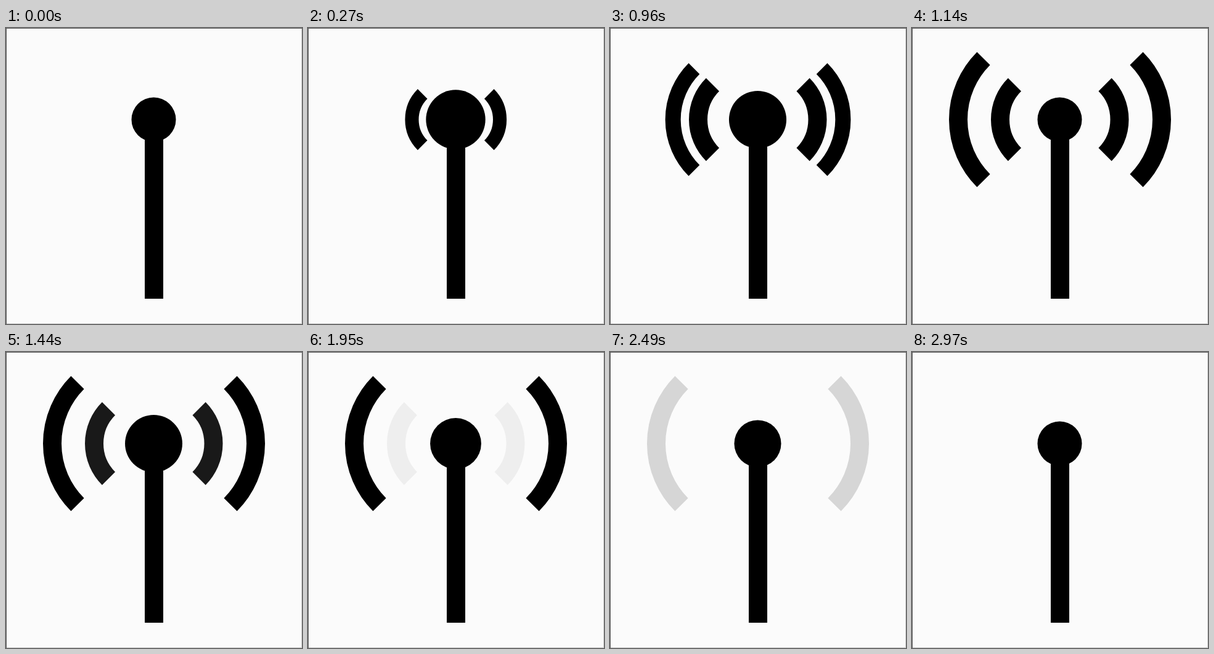
Animation, 480 px wide and 480 px high, one loop 3000 ms. Source, as an HTML page with a canvas:

```html
<!DOCTYPE html>
<html>
<head>
<meta charset="utf-8">
<style>
  html, body { margin: 0; height: 100%; overflow: hidden; background: #fbfbfb; }
  canvas { display: block; }
</style>
</head>
<body>
<canvas id="stage" width="480" height="480"></canvas>
<script>
const ctx = document.getElementById('stage').getContext('2d');
const LOOP = 3000, STEP = 30, BEAT = 600;
const CY = 148.5;

// Linear progress from 0 to 1 between two times
const ramp = (t, from, to) => Math.min(1, Math.max(0, (t - from) / (to - from)));

function rect(color, x, y, w, h) {
  ctx.fillStyle = color;
  ctx.fillRect(x, y, w, h);
}

// A pair of mirrored arcs that grows, holds, then fades out
function wave(t, cx, offset, radius) {
  const alpha = ramp(t, 54, 200) * (1 - ramp(t, 1380, 1980));
  if (!alpha) return;
  const scale = 0.5 + 0.5 * ramp(t, 54, 510);
  ctx.save();
  ctx.globalAlpha = alpha;
  ctx.translate(cx, CY);
  ctx.lineWidth = 30;
  for (const side of [-1, 1]) {
    ctx.save();
    ctx.scale(side * scale, scale);
    ctx.beginPath();
    ctx.arc(offset, 0, radius, -Math.PI / 4, Math.PI / 4);
    ctx.stroke();
    ctx.restore();
  }
  ctx.restore();
}

function draw(t) {
  rect('#fbfbfb', 0, 0, 480, 480);
  rect('#c4c4c4', 479, 0, 1, 480);
  rect('#c4c4c4', 0, 479, 480, 1);
  rect('#555', 0, 0, 480, 1);
  rect('#555', 0, 0, 1, 480);

  wave(t, 239.75, 16.75, 80);
  wave(t - BEAT, 240, 25, 140);

  const beat = t % BEAT;
  const pulse = ramp(beat, 54, 294) - ramp(beat, 318, 510);
  rect('#000', 225, CY, 30, 290.5);
  ctx.beginPath();
  ctx.arc(239.5, CY, 36 + 13.5 * pulse, 0, 2 * Math.PI);
  ctx.fill();
}

const start = performance.now();
function tick() {
  const t = (performance.now() - start) % LOOP;
  draw(Math.floor(t / STEP) * STEP);
  requestAnimationFrame(tick);
}
tick();
</script>
</body>
</html>
```
